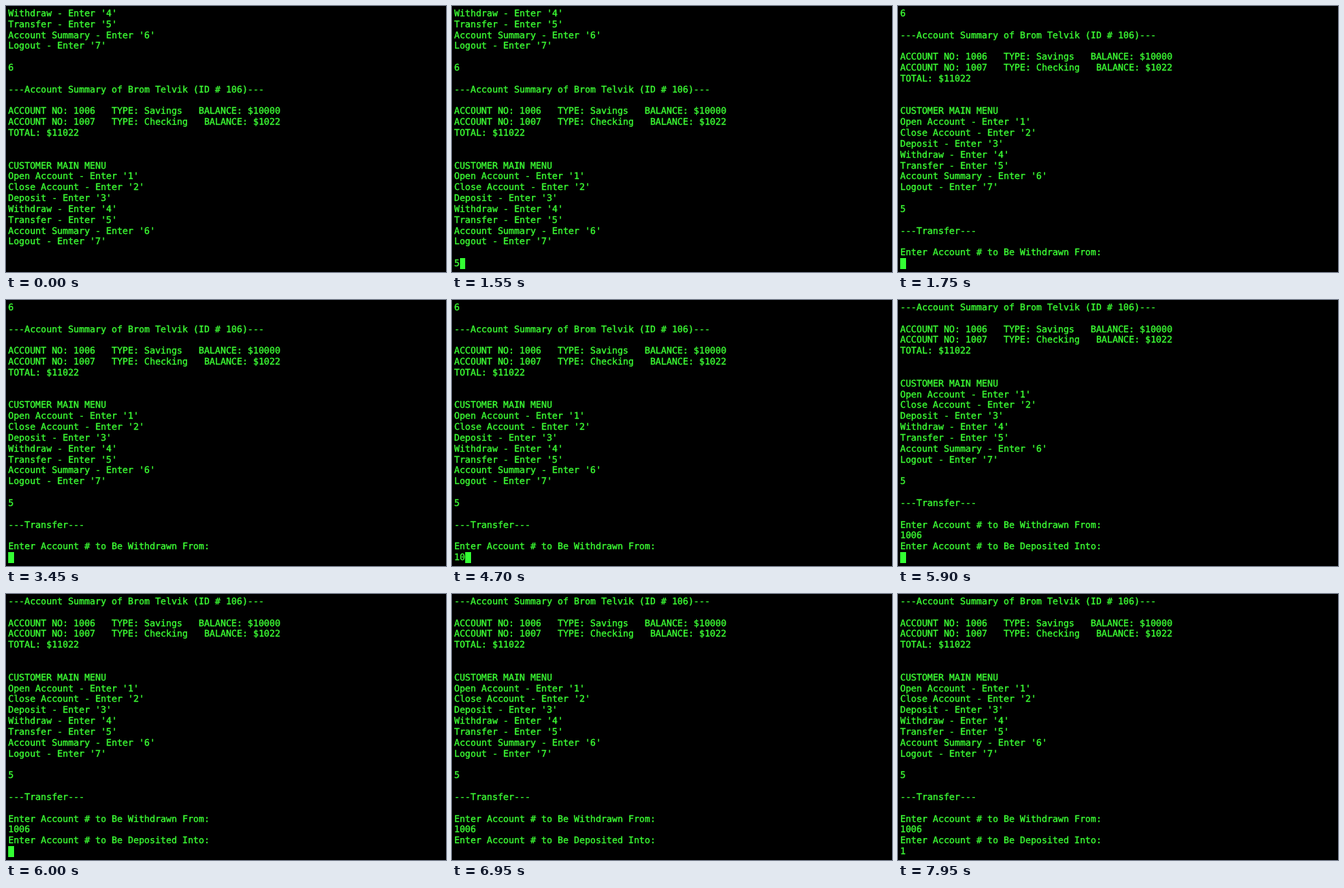
Animation, 600 px wide and 363 px high, one loop 8 s. Source, as an HTML page:

```html
<!DOCTYPE html>
<html lang="en">
<head>
<meta charset="utf-8">
<title>Terminal banking session</title>
<style>
  html, body { margin: 0; width: 100%; height: 100%; overflow: hidden; background: #000; }
  #screen, #cursor { position: absolute; margin: 0; }
  #screen {
    left: 3px;
    top: 3px;
    color: #3cff34;
    font: 12.33px/14.83px "DejaVu Sans Mono", monospace;
    -webkit-text-stroke: 0.35px;
    text-rendering: geometricPrecision;
    font-variant-ligatures: none;
  }
  #cursor { top: 344px; width: 7.42px; height: 15px; background: #33ff33; }
</style>
</head>
<body>
<pre id="screen"></pre>
<div id="cursor"></div>
<script>
const LOOP = 8000, ROWS = 24, COL = 7.42, CURSOR_LEFT = 3.4;

const actions = ["Open Account", "Close Account", "Deposit", "Withdraw",
                 "Transfer", "Account Summary", "Logout"]
  .map((label, i) => `${label} - Enter '${i + 1}'`);

const start = [
  ...actions.slice(3), "", "6", "",
  "---Account Summary of Brom Telvik (ID # 106)---", "",
  "ACCOUNT NO: 1006   TYPE: Savings   BALANCE: $10000",
  "ACCOUNT NO: 1007   TYPE: Checking   BALANCE: $1022",
  "TOTAL: $11022", "", "",
  "CUSTOMER MAIN MENU", ...actions, ""
];
const transfer = [...start, "5", "", "---Transfer---", "",
                  "Enter Account # to Be Withdrawn From:"];
const deposit = [...transfer, "1006", "Enter Account # to Be Deposited Into:"];

// [time in ms, printed lines, typed input, cursor visible]
const steps = [
  [0, start, "", false],
  [450, start, "", true],
  [900, start, "", false],
  [1550, start, "5", true],
  [1750, transfer, "", true],
  [2900, transfer, "", false],
  [3450, transfer, "", true],
  [3900, transfer, "1", false],
  [4700, transfer, "10", true],
  [4850, transfer, "100", false],
  [5650, transfer, "1006", true],
  [5900, deposit, "", true],
  [6650, deposit, "", false],
  [7350, deposit, "1", true],
  [7900, deposit, "1", false]
];

const screenEl = document.getElementById("screen");
const cursorEl = document.getElementById("cursor");
const origin = performance.now();
let shown;

function show([, lines, input, cursorOn]) {
  screenEl.textContent = [...lines, input].slice(-ROWS).join("\n");
  cursorEl.style.left = CURSOR_LEFT + input.length * COL + "px";
  cursorEl.style.visibility = cursorOn ? "visible" : "hidden";
}

function tick() {
  const time = (performance.now() - origin) % LOOP;
  const step = steps.filter(([at]) => at <= time).pop();
  if (step !== shown) show(shown = step);
  requestAnimationFrame(tick);
}
tick();
</script>
</body>
</html>
```
